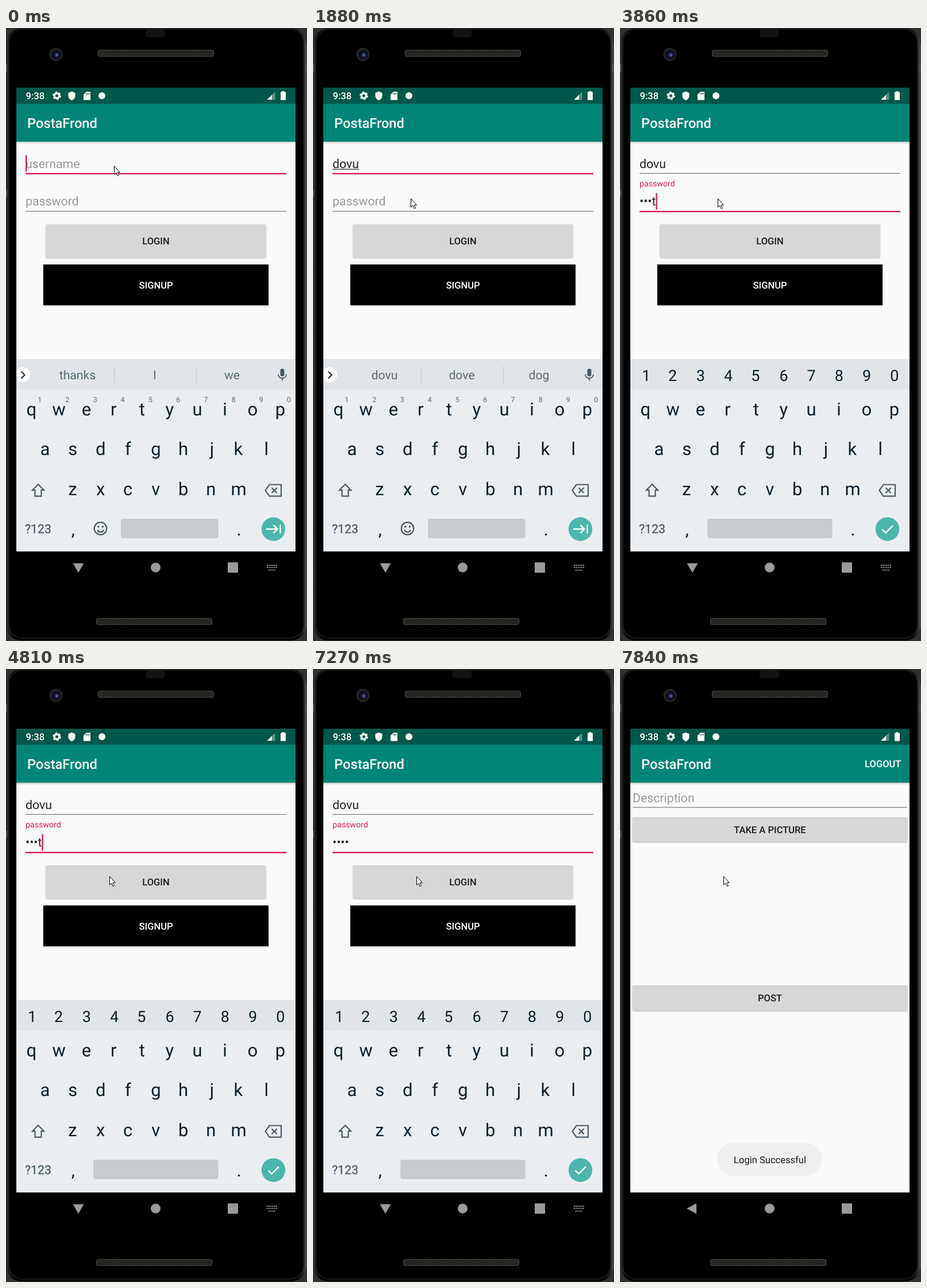
These frames come from a looping animation (524 by 1068 pixels, 8000 ms). An HTML page:

```html
<!DOCTYPE html>
<html lang="en">
<head>
<meta charset="utf-8">
<title>Login on a phone</title>
<style>
  html, body { margin: 0; width: 100%; height: 100%; overflow: hidden; background: #000; }
  svg { display: block; width: 524px; height: 1068px; font-family: Roboto, sans-serif; text-rendering: geometricPrecision; }
  .field { font-size: 21.28px; fill: #212121; }
  .hint { fill: #9a9a9a; }
  .caps { font-size: 16.55px; font-weight: 500; fill: #1c1c1c; }
  .mid, .super, .word { text-anchor: middle; }
  .title { font-size: 23.65px; font-weight: 500; fill: #fff; }
  .key { font-size: 31px; fill: #0b1f2a; }
  .digit { font-size: 27px; fill: #0b1f2a; }
  .super { font-size: 13px; font-weight: 500; fill: #7c878e; }
  .word { font-size: 21.2px; fill: #5b6a73; }
  .icon { fill: none; stroke: #4a5a64; stroke-width: 2.2; }
  .white { fill: none; stroke: #fff; stroke-width: 2.4; }
  .button { fill: #d6d7d7; }
</style>
</head>
<body>
<svg viewBox="0 0 524 1068">
  <defs>
    <pattern id="mesh" width="4" height="4" patternUnits="userSpaceOnUse">
      <rect width="4" height="4" fill="#1b1b19"/><path d="M0 0L4 4M4 0L0 4" stroke="#35342f" stroke-width=".8"/>
    </pattern>
    <linearGradient id="edge">
      <stop offset="0" stop-color="#303030"/><stop offset=".012" stop-color="#161616"/>
      <stop offset=".03" stop-color="#000"/><stop offset=".97" stop-color="#000"/>
      <stop offset=".988" stop-color="#1c1c1c"/><stop offset="1" stop-color="#484848"/>
    </linearGradient>
    <linearGradient id="fade" x2="0" y2="1">
      <stop offset="0" stop-opacity=".22"/><stop offset="1" stop-opacity="0"/>
    </linearGradient>
    <radialGradient id="lens">
      <stop offset="0" stop-color="#8590dc"/><stop offset=".4" stop-color="#2f3a80"/><stop offset="1" stop-color="#0e0f18"/>
    </radialGradient>
    <filter id="shadow" x="-5%" y="-20%" width="110%" height="150%">
      <feDropShadow dx="0" dy="1.2" stdDeviation="1" flood-opacity=".3"/>
    </filter>
    <clipPath id="screen"><rect x="18" y="104" width="486" height="810"/></clipPath>
    <clipPath id="reveal"><rect id="revealBox" x="18" width="486" height="810"/></clipPath>
    <clipPath id="loginShape"><rect x="69.500" y="342" width="383" height="57.500" rx="2"/></clipPath>
    <g id="bars">
      <rect x="18" y="104" width="486" height="808" fill="#fafafa"/>
      <rect x="18" y="104" width="486" height="28" fill="#00574b"/>
      <rect x="18" y="132" width="486" height="66" fill="#008577"/>
      <rect x="18" y="198" width="486" height="4" fill="url(#fade)"/>
      <text class="title" x="37" y="174">PostaFrond</text>
    </g>
  </defs>

  <!-- phone body -->
  <rect width="524" height="1068" fill="#303030"/>
  <rect x=".5" y="1" width="522" height="1066" rx="26" fill="url(#edge)"/>
  <rect x="5" y="2" width="513" height="1061" rx="24" fill="#000" stroke="#1d1d1d" stroke-width="1.5"/>
  <path d="M523.200 30V1045" stroke="#4d4d4d" stroke-width="1.600"/>
  <path d="M1 62V76M1 282V294M522 62V76" stroke="#555" stroke-width="2"/>
  <rect x="243" y="3" width="34" height="13" rx="5" fill="#131313"/>
  <g fill="url(#mesh)" stroke="#484744" stroke-width="1.2">
    <rect x="160.500" y="38.500" width="201" height="11" rx="3.500"/>
    <rect x="157.500" y="1028.500" width="201" height="11" rx="3.500"/>
  </g>
  <circle cx="87" cy="46" r="11.500" fill="#252527"/>
  <circle cx="87.500" cy="46.500" r="8.500" fill="#0e0f18"/>
  <circle cx="88.500" cy="47" r="5" fill="url(#lens)"/>

  <g clip-path="url(#screen)">
    <g id="login">
      <use href="#bars"/>
      <text class="field hint" id="userHint" x="34" y="244">username</text>
      <text class="field" id="user" x="34" y="244"></text>
      <rect id="composing" x="34" y="245.500" height="1.200" fill="#212121"/>
      <rect id="userLine" x="34" width="454"/>
      <text id="passLabel" x="34">password</text>
      <text class="field" id="pass" x="34" y="309"></text>
      <rect id="passLine" x="34" width="454"/>
      <rect id="caret" width="2.300" height="29" fill="#d81b60"/>
      <rect class="button" x="69.500" y="342" width="383" height="57.500" rx="2" filter="url(#shadow)"/>
      <circle id="ripple" cx="181" cy="362" fill-opacity=".12" clip-path="url(#loginShape)"/>
      <text class="caps mid" x="261" y="377">LOGIN</text>
      <rect x="65" y="412" width="392" height="71" filter="url(#shadow)"/>
      <text class="caps mid" x="261" y="454" style="fill:#fff">SIGNUP</text>
      <rect id="dim" x="18" y="104" width="486" height="830" fill-opacity=".1"/>
    </g>

    <g id="post" clip-path="url(#reveal)">
      <g id="postPage">
        <use href="#bars"/>
        <text class="caps" x="489.400" y="171" text-anchor="end" style="fill:#fff">LOGOUT</text>
        <text class="field hint" x="22" y="232">Description</text>
        <rect x="22.500" y="240.500" width="477.500" height="1.200" fill="#777"/>
        <rect class="button" x="22" y="258" width="478" height="43" rx="2" filter="url(#shadow)"/>
        <text class="caps mid" x="261" y="286">TAKE A PICTURE</text>
        <rect class="button" x="22" y="551" width="478" height="44" rx="2" filter="url(#shadow)"/>
        <text class="caps mid" x="261" y="579">POST</text>
      </g>
      <rect x="169" y="825.500" width="183" height="57.500" rx="28" fill="#f0f0f0"/>
      <text class="mid" x="261" y="861" font-size="16.550" fill="#1c1c1c">Login Successful</text>
    </g>

    <g id="keyboard">
      <rect x="18" y="577" width="486" height="335" fill="#ebeef1"/>
      <rect x="18" y="577" width="486" height="53" fill="#e1e5e8"/>
      <g id="keys"></g>
      <path class="icon" d="M56 795L66 805.200H61.500V815.700H50.500V805.200H46Z"/>
      <path class="icon" d="M458.500 795.500H479V815.700H458.500L451.500 805.600ZM462.500 801L471.700 810.200M471.700 801L462.500 810.200"/>
      <text class="mid" x="56" y="880" font-size="21.300" style="fill:#4a5a64;stroke:#4a5a64;stroke-width:.3">?123</text>
      <rect id="space" y="855" height="34" rx="4" fill="#c8ccd0"/>
      <circle cx="465.500" cy="873" r="20.700" fill="#4db6ac"/>
      <g id="textMode">
        <circle cx="29" cy="604" r="13" fill="#fff"/>
        <path class="icon" d="M26.500 598.500L32.500 604.500 26.500 610.500" style="stroke:#263238"/>
        <path d="M188.500 590V619M331.500 590V619" stroke="#c3c9cd" stroke-width="1.200"/>
        <g id="words"><text class="word" x="124.500" y="612"></text><text class="word" x="259" y="612"></text><text class="word" x="393.500" y="612"></text></g>
        <rect x="477.500" y="593.500" width="7" height="13.500" rx="3.500" fill="#4a5a64"/>
        <path class="icon" d="M474 603.500C474 612.500 488 612.500 488 603.500M481 610V614.500" style="stroke-width:1.800"/>
        <circle class="icon" cx="164.500" cy="872" r="10.800"/>
        <path class="icon" d="M159 874.500C161 879.500 168 879.500 170 874.500"/>
        <circle cx="160.700" cy="868.800" r="1.800" fill="#4a5a64"/><circle cx="168.300" cy="868.800" r="1.800" fill="#4a5a64"/>
        <path class="white" d="M453 873H472M465.500 866L472.500 873 465.500 880M477.500 865.500V880.500"/>
      </g>
      <g id="passMode"><path class="white" d="M456.500 873.500L462.500 879.500 475 867"/></g>
    </g>
  </g>

  <!-- status icons -->
  <g fill="#fff">
    <text x="34.500" y="124" font-size="16.500" font-weight="500">9:38</text>
    <circle cx="88.500" cy="118" r="4.200" fill="none" stroke="#fff" stroke-width="3.400"/>
    <circle cx="88.500" cy="118" r="6.300" fill="none" stroke="#fff" stroke-width="2.200" stroke-dasharray="3.300"/>
    <path d="M114.500 110.500L120.500 113V118C120.500 122 118 124.500 114.500 126 111 124.500 108.500 122 108.500 118V113Z"/>
    <path d="M140 111H147V125.500H135V116Z"/>
    <path d="M140 113V116M142.500 113V116M145 113V116" stroke="#00574b" stroke-width="1.200"/>
    <circle cx="167" cy="118" r="6"/>
    <path d="M468.500 111V125H454.500Z" opacity=".35"/><path d="M463 116.500V125H454.500Z"/>
    <path d="M480.500 110H484.500V111.500H487V125.500H478V111.500H480.500Z"/>
  </g>

  <!-- navigation bar -->
  <g fill="#9a9a9a">
    <path id="back"/>
    <circle cx="260.500" cy="940" r="8.500"/>
    <rect x="386" y="931" width="18" height="18" rx="1"/>
    <path id="switcher" d="M454 936H472M454 939.700H472M457 944.500H469" stroke="#9a9a9a" stroke-width="2" stroke-dasharray="2 1.200"/>
  </g>
  <path id="mouse" d="M.5 .5V15.300L3.800 12.200 6.200 17.700 8.500 16.700 6.100 11.300H10.300Z" fill="#fff" stroke="#000"/>
</svg>
<script>
const $ = id => document.getElementById(id);
const set = (id, attrs) => { for (const k in attrs) $(id).setAttribute(k, attrs[k]); };
const show = (id, on) => { $(id).style.display = on ? '' : 'none'; };

const ruler = document.createElement('canvas').getContext('2d');
const row = (chars, cls, x, y) => [...chars].map((c, i) =>
  `<text class="${cls}" x="${x + i * 48.2}" y="${y}">${c}</text>`).join('');

// Key labels are centred on their ink, not on their advance width.
function inkRow(chars, cls, size, x, y) {
  ruler.font = `${size}px Roboto, sans-serif`;
  return [...chars].map((c, i) => {
    const m = ruler.measureText(c);
    return row(c, cls, x + i * 48.2 + (m.actualBoundingBoxLeft - m.actualBoundingBoxRight) / 2, y);
  }).join('');
}
$('keys').innerHTML = inkRow('qwertyuiop', 'key', 31, 43.9, 675) + inkRow('asdfghjkl', 'key', 31, 68, 744)
  + inkRow('zxcvbnm', 'key', 31, 116.2, 814) + inkRow(',', 'key', 31, 116.2, 884) + inkRow('.', 'key', 31, 405.4, 884);
$('textMode').innerHTML += row('1234567890', 'super', 58.7, 651.5);
$('passMode').innerHTML += inkRow('1234567890', 'digit', 27, 43.9, 614.5);

// Each step changes part of the running state.
const steps = [
  [0, { user: '', pass: '', onPass: false, caret: true, float: 0, numbers: false, ripple: 0,
        words: ['thanks', 'I', 'we'], mouse: [188, 240], next: false, lift: 0, rise: 0, reveal: 104, kbd: 1 }],
  [150, { caret: false }],
  [480, { user: 'd', caret: true, words: ['d', 'do', 'did'] }],
  [900, { user: 'do', words: ['do', 'done', 'dot'] }],
  [1180, { user: 'dov', words: ['dov', 'dove', 'dog'] }],
  [1330, { user: 'dovu', words: ['dovu', 'dove', 'dog'] }],
  [1760, { mouse: [181, 264] }],
  [1880, { mouse: [170, 297], caret: false }],
  [2160, { onPass: true, caret: true, float: .3 }],
  [2290, { float: .9, numbers: true }],
  [2420, { float: 1 }],
  [2550, { caret: false }],
  [2690, { caret: true }],
  [2940, { caret: false }],
  [3130, { pass: 't', caret: true }],
  [3270, { pass: '•e' }],
  [3580, { pass: '••s' }],
  [3860, { pass: '•••t' }],
  [4390, { mouse: [171, 309], caret: false }],
  [4530, { mouse: [175, 338] }],
  [4670, { mouse: [179, 357] }],
  [4810, { mouse: [180, 361], caret: true }],
  [5240, { pass: '••••', caret: false }],
  [5380, { ripple: 130 }],
  [5520, { ripple: 290 }],
  [5660, { ripple: 0 }],
  [6030, { caret: true }],
  [7270, { caret: false }],
  [7540, { next: true, lift: 8, rise: 19, reveal: 228, kbd: .97 }],
  [7690, { lift: 16, rise: 2, reveal: 118, kbd: 0 }],
  [7840, { rise: 0, reveal: 104 }]
];

function underline(id, bottom, focused) {
  const height = focused ? 2.4 : 1.2;
  set(id, { y: bottom - height, height, fill: focused ? '#d81b60' : '#777' });
}

function draw(s) {
  $('user').textContent = s.user;
  $('pass').textContent = s.pass;
  show('userHint', !s.user);
  const userWidth = s.user ? $('user').getComputedTextLength() : 0;
  const passWidth = s.pass ? $('pass').getComputedTextLength() : 0;
  set('composing', { width: s.onPass ? 0 : userWidth });
  underline('userLine', s.onPass ? 254 : 255, !s.onPass);
  underline('passLine', s.onPass ? 321 : 320, s.onPass);
  set('passLabel', { y: 309 - 33 * s.float, 'font-size': 21.28 - 7.09 * s.float, fill: s.float ? '#d81b60' : '#9a9a9a' });
  set('caret', { x: 34 + (s.onPass ? passWidth : userWidth), y: s.onPass ? 287.5 : 221.5 });
  show('caret', s.caret);
  set('ripple', { r: s.ripple });

  show('textMode', !s.numbers);
  show('passMode', s.numbers);
  set('space', s.numbers ? { x: 152, width: 217.5 } : { x: 200, width: 169.5 });
  [...$('words').children].forEach((el, i) => el.textContent = s.words[i]);
  set('keyboard', { opacity: s.kbd, transform: `translate(0 ${s.next ? 2 : 0})` });

  show('dim', s.next);
  show('post', s.next);
  set('login', { transform: `translate(0 ${-s.lift})` });
  set('postPage', { transform: `translate(0 ${s.rise})` });
  set('revealBox', { y: s.reveal });
  set('back', { d: s.next ? 'M133 931V949L116 940Z' : 'M116.500 932.500H135.500L126 949Z' });
  show('switcher', !s.next);
  set('mouse', { transform: `translate(${s.mouse})` });
}

const start = performance.now();
let shown = -1;
function tick() {
  const t = (performance.now() - start) % 8000;
  const current = steps.filter(([time]) => time <= t);
  if (current.length !== shown) {
    shown = current.length;
    draw(Object.assign({}, ...current.map(([, change]) => change)));
  }
  requestAnimationFrame(tick);
}
tick();
</script>
</body>
</html>
```
